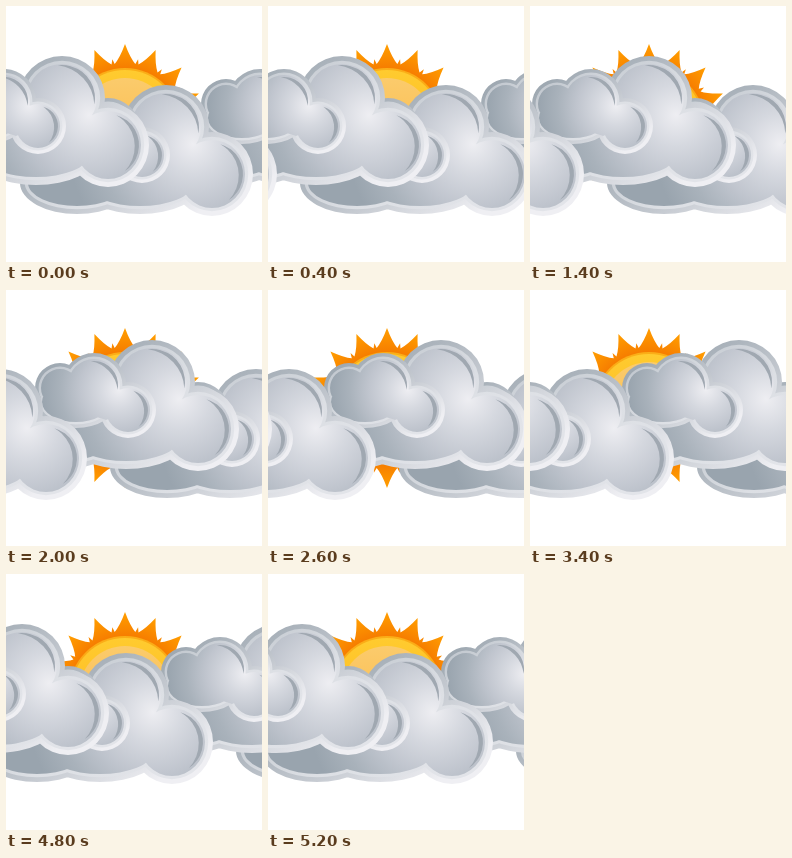
An HTML page with a canvas for the animation above (5.4 s loop, 256 px wide and 256 px high).

```html
<!DOCTYPE html>
<html lang="en">
<head>
<meta charset="utf-8">
<title>Sun behind drifting clouds</title>
<style>
  html, body { margin: 0; width: 100%; height: 100%; overflow: hidden; background: #fff; }
  canvas { display: block; width: 256px; height: 256px; }
</style>
</head>
<body>
<canvas id="sky" width="256" height="256"></canvas>
<script>
const ctx = document.getElementById('sky').getContext('2d');
const SIZE = 256, STEP_MS = 200, STEPS = 27, SPEED = 9;
const TAU = Math.PI * 2;

// Lobes are [x, y, rx, ry]: top bump, right bump, then the rest.
// The core joins their centres, the light radiates from the inner notch.
const MAIN = {
  lobes: [[146, 92, 43, 42], [192, 139, 41, 42], [57, 148, 57, 31], [120, 150, 60, 29]],
  core: [[57, 130], [112, 105], [146, 92], [192, 139], [120, 160], [57, 160]],
  light: [173, 109, 125],
  rim: [90, 55, 175, 180]
};
const SUB = {
  lobes: [[88, 95, 32, 32], [122, 120, 28, 28], [54, 98, 25, 25], [70, 112, 40, 26]],
  core: [[54, 98], [88, 95], [122, 120], [100, 130], [70, 120]],
  light: [113, 100, 78],
  rim: [55, 70, 115, 150]
};

function tint(g, colors) {
  colors.forEach((c, i) => g.addColorStop(i / (colors.length - 1), c));
  return g;
}

function outline({ lobes, core }, inset) {
  const path = new Path2D();
  for (const [x, y, rx, ry] of lobes) {
    path.moveTo(x + rx - inset, y);
    path.ellipse(x, y, rx - inset, ry - inset, 0, 0, TAU);
  }
  core.forEach(([x, y], i) => i ? path.lineTo(x, y) : path.moveTo(x, y));
  path.closePath();
  return path;
}

// Tapered shade along the right side of a bump.
function crescent([x, y, rx], inset, mid, half, shift) {
  const r = rx - inset;
  const px = r * Math.cos(half) + shift, py = r * Math.sin(half);
  const turn = Math.atan2(py, px);
  ctx.beginPath();
  ctx.arc(x, y, r, mid - half, mid + half);
  ctx.arc(x - shift * Math.cos(mid), y - shift * Math.sin(mid),
    Math.hypot(px, py), mid + turn, mid - turn, true);
  ctx.closePath();
  ctx.fill();
}

function puff(shape, rim) {
  const [x, y, r] = shape.light;
  const edge = colors => tint(ctx.createLinearGradient(...shape.rim), colors);
  const layers = [
    [0, edge(['#9fa9b2', '#c3c8cf', '#efeff3'])],
    [rim * 0.6, edge(['#c3c9d0', '#dcdfe4', '#e2e4e9'])],
    [rim, tint(ctx.createRadialGradient(x, y, 0, x, y, r),
      ['#eeeef2', '#d5d8df', '#c0c5ce', '#a9b2bb', '#99a4ae'])]
  ];
  for (const [inset, fill] of layers) {
    ctx.fillStyle = fill;
    ctx.fill(outline(shape, inset));
  }
  ctx.fillStyle = '#a0a8b1';
  crescent(shape.lobes[0], rim + 2, -0.75, 0.95, 12);
  crescent(shape.lobes[1], rim + 2, -0.15, 1.15, 9);
}

function cloud(x, y) {
  ctx.save();
  ctx.translate(x, y);
  puff(MAIN, 8);
  puff(SUB, 6);
  ctx.restore();
}

function sun() {
  ctx.save();
  ctx.translate(119, 118);
  const glow = ctx.createRadialGradient(0, 0, 55, 0, 0, 78);
  ctx.fillStyle = tint(glow, ['#f67c00', '#ff9c00']);
  const at = (r, a) => [r * Math.cos(a), r * Math.sin(a)];
  ctx.beginPath();
  for (let i = 0; i < 16; i++) {
    const a = i * TAU / 16;
    ctx.lineTo(...at(61, a - 0.17));
    ctx.quadraticCurveTo(...at(66, a - 0.08), ...at(80, a));
    ctx.quadraticCurveTo(...at(66, a + 0.08), ...at(61, a + 0.17));
    ctx.lineTo(...at(66, a + 0.2));
  }
  ctx.closePath();
  ctx.fill();

  const disc = (r, colors) => {
    ctx.fillStyle = tint(ctx.createLinearGradient(0, -r, 0, r), colors);
    ctx.beginPath();
    ctx.arc(0, 0, r, 0, TAU);
    ctx.fill();
  };
  disc(56, ['#fbae17', '#f99a10']);
  disc(54, ['#ffcb2f', '#ffb41c']);
  disc(46, ['#fbcb6c', '#fbb845']);
  ctx.restore();
}

function draw(step) {
  const x = step * SPEED;
  ctx.fillStyle = '#fff';
  ctx.fillRect(0, 0, SIZE, SIZE);
  sun();
  // Each cloud overlaps the neighbour on its right.
  for (let k = 1; k >= -2; k--) {
    cloud(x + 14 + k * SIZE, 29);
    cloud(x - 90 + k * SIZE, 0);
  }
}

let shown = -1;
function tick() {
  const step = Math.floor(performance.now() / STEP_MS) % STEPS;
  if (step !== shown) draw(shown = step);
  requestAnimationFrame(tick);
}
tick();
</script>
</body>
</html>
```
